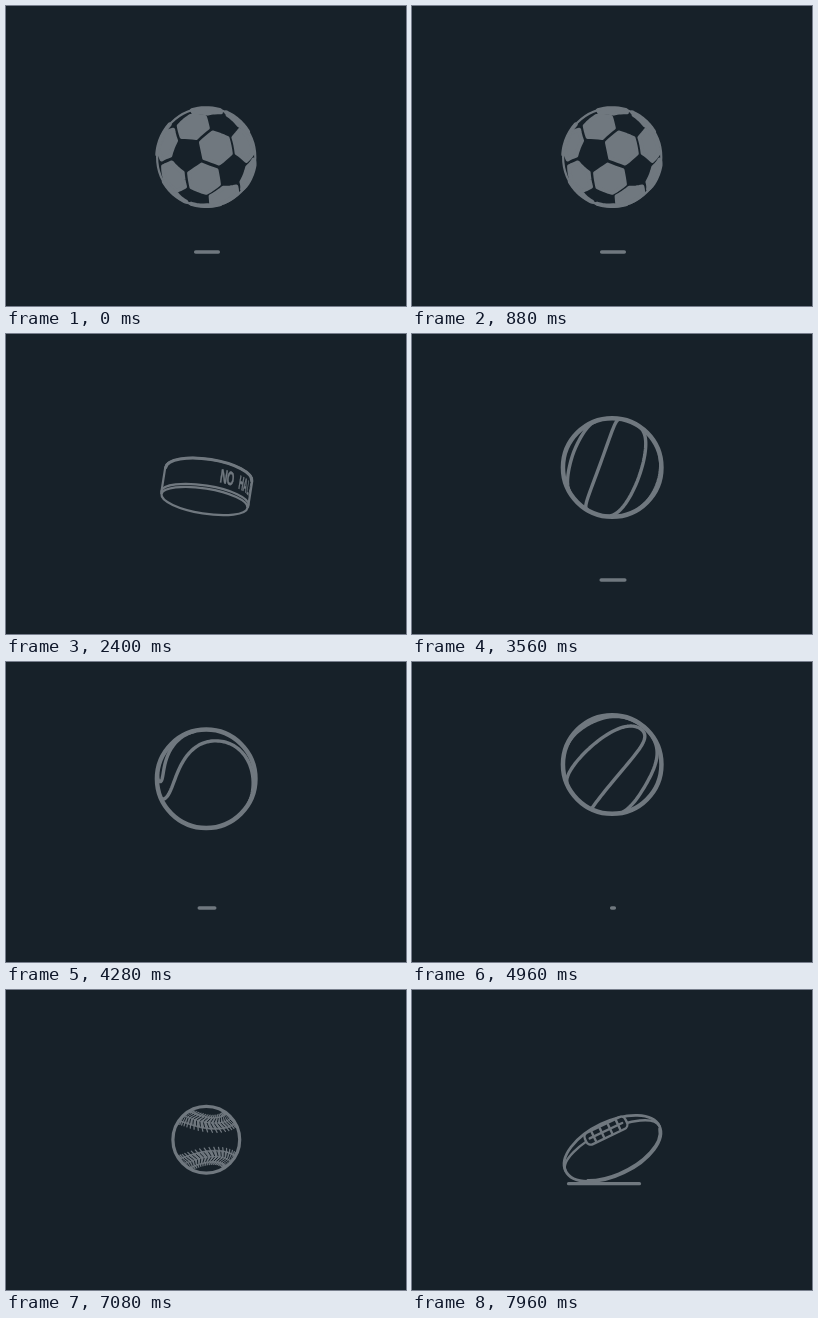
Animation of 400 by 300 pixels, one loop 8 s. Source, as an HTML page with a canvas:

```html
<!DOCTYPE html>
<html lang="en">
<head>
<meta charset="utf-8">
<title>Sports balls</title>
<style>
  html, body { margin: 0; width: 100%; height: 100%; overflow: hidden; background: #172129; }
  canvas { display: block; width: 400px; height: 300px; }
</style>
</head>
<body>
<canvas id="stage" width="400" height="300"></canvas>
<script>
const ctx = document.getElementById('stage').getContext('2d');
const BG = '#172129', INK = '#70787f', LOOP = 8000, TAU = Math.PI * 2;
const rad = deg => deg * Math.PI / 180;

// --- vectors: x right, y down, z towards the viewer ---
const dot = (a, b) => a[0] * b[0] + a[1] * b[1] + a[2] * b[2];
const cross = (a, b) => [a[1] * b[2] - a[2] * b[1], a[2] * b[0] - a[0] * b[2], a[0] * b[1] - a[1] * b[0]];
const mix = (...terms) => [0, 1, 2].map(i => terms.reduce((sum, [k, v]) => sum + k * v[i], 0));
const unit = v => mix([1 / Math.hypot(...v), v]);
const rotate = (v, axis, angle) => {
  const c = Math.cos(angle);
  return mix([c, v], [Math.sin(angle), cross(axis, v)], [dot(axis, v) * (1 - c), axis]);
};
const SPIN_AXIS = unit([-.36, -.76, .54]);

function circle(r, width) {
  ctx.lineWidth = width;
  ctx.beginPath();
  ctx.arc(0, 0, r - width / 2, 0, TAU);
  ctx.stroke();
}

function segment(x1, y1, x2, y2) {
  ctx.beginPath();
  ctx.moveTo(x1, y1);
  ctx.lineTo(x2, y2);
  ctx.stroke();
}

// Strokes the part of a curve that lies on the near side of a sphere.
function strokeNear(points, r) {
  let drawing = false;
  ctx.beginPath();
  for (const [x, y, z] of points) {
    if (z > 0) drawing ? ctx.lineTo(x * r, y * r) : ctx.moveTo(x * r, y * r);
    drawing = z > 0;
  }
  ctx.stroke();
}

// --- bouncing ---
function bounce(t, { apexTime, period, top, drop, squash, shadow, r }, drawBall) {
  const phase = (t - apexTime) / period;
  const d = Math.abs(phase - Math.round(phase)) * 2;   // 0 at the apex, 1 on the ground
  const s = squash * Math.max(0, (d - .86) / .14);
  const w = shadow * d;
  if (w > 1) {
    ctx.lineWidth = Math.min(3.6, w);
    const half = Math.max(.05, (w - 3.6) / 2);
    segment(201 - half, 246, 201 + half, 246);
  }
  ctx.translate(200.2, top + drop * d * d + r * s);
  ctx.scale(1 + s, 1 - s);
  drawBall();
}

// --- soccer ball: hexagons of a truncated icosahedron ---
const hexagons = (() => {
  const n = unit([-.41, -.06, .91]), toHex = [.27, -.21, .945];
  const u = unit(mix([1, toHex], [-dot(toHex, n), n])), v = cross(n, u);
  const half = [n];
  for (let k = 0; k < 5; k++) {
    const a = rad(36 + 72 * k), s = 2 / Math.sqrt(5);
    half.push(mix([1 / Math.sqrt(5), n], [s * Math.cos(a), u], [s * Math.sin(a), v]));
  }
  const verts = half.concat(half.map(p => mix([-1, p])));
  const near = (a, b) => dot(a, b) > .4;
  const list = [];
  verts.forEach((a, i) => verts.slice(i + 1).forEach((b, j) => verts.slice(i + j + 2).forEach(c => {
    if (!near(a, b) || !near(b, c) || !near(a, c)) return;
    const mid = unit(mix([1, a], [1, b], [1, c]));
    const corners = [[a, b], [b, a], [b, c], [c, b], [c, a], [a, c]]
      .map(([p, q]) => mix([.8, unit(mix([2, p], [1, q]))], [.2, mid]));
    const outline = corners.flatMap((p, k) => [0, .25, .5, .75]
      .map(f => unit(mix([1 - f, p], [f, corners[(k + 1) % 6]]))));
    list.push(outline);
  })));
  return list;
})();

function soccerBall(t) {
  const r = 49, angle = TAU * t / 880;
  for (const hex of hexagons) {
    const pts = hex.map(p => rotate(p, SPIN_AXIS, angle));
    if (pts.every(p => p[2] < 0)) continue;
    ctx.beginPath();
    for (const [x, y, z] of pts) {
      const k = z < 0 ? r / Math.hypot(x, y) : r;
      ctx.lineTo(x * k, y * k);
    }
    ctx.closePath();
    ctx.lineWidth = 4;
    ctx.fill();
    ctx.stroke();
  }
  circle(50.2, 2.2);
}

// --- basketball: two concentric ovals that reach beyond the poles ---
const ovals = (() => {
  const q = unit([.34, -.94, 0]), m = unit([.17, .06, .98]), w = cross(m, q);
  return [[100, 25], [120, 68]].map(([length, width]) => Array.from({ length: 121 }, (_, i) => {
    const a = TAU * i / 120, along = rad(length) * Math.cos(a), across = rad(width) * Math.sin(a);
    return mix([Math.cos(across) * Math.cos(along), m],
               [Math.cos(across) * Math.sin(along), q],
               [Math.sin(across), w]);
  }));
})();

function basketball(t) {
  const angle = rad(405) * (t - 3560) / 1400;
  ctx.lineWidth = 3.4;
  for (const oval of ovals) strokeNear(oval.map(p => rotate(p, SPIN_AXIS, angle)), 49);
  circle(51.5, 4.5);
}

// --- puck ---
function puck(t) {
  const rx = 43.5, height = 27;
  const arc = (y, radius, ry) => ctx.ellipse(0, y, radius, ry, 0, Math.PI, TAU);
  ctx.translate(198.5, 167);
  ctx.rotate(rad(9));
  ctx.lineWidth = 2.2;
  ctx.beginPath();
  ctx.ellipse(0, 0, rx, 12.5, 0, 0, TAU);
  ctx.stroke();
  ctx.beginPath();
  arc(-3, rx + .5, 12.5);
  ctx.stroke();
  ctx.beginPath();
  ctx.moveTo(-rx - .5, -1);
  arc(-height, rx + .5, 15);
  ctx.lineTo(rx + .5, -1);
  ctx.stroke();
  ctx.lineWidth = 3;
  ctx.beginPath();
  arc(-height, rx, 15);
  ctx.stroke();

  ctx.font = 'bold 19px "Liberation Sans", Arial, sans-serif';
  ctx.textAlign = 'center';
  ctx.lineWidth = .6;
  const lead = rad(21) - TAU * (t - 2400) / 1280;
  [...'NO HALFTIME'].forEach((letter, i) => {
    const a = lead + rad(10) * i, c = Math.cos(a);
    if (c < .05) return;
    ctx.save();
    ctx.translate(rx * Math.sin(a), -9.5 - 12 * c);
    ctx.transform(.58 * c, .15 * Math.sin(a), 0, 1, 0, 0);
    ctx.fillText(letter, 0, 0);
    ctx.strokeText(letter, 0, 0);
    ctx.restore();
  });
}

// --- baseball: stitched band along a tennis-ball curve ---
function seamPoint(a) {
  const x = .75 * Math.cos(a) + .25 * Math.cos(3 * a);
  const y = .75 * Math.sin(a) - .25 * Math.sin(3 * a);
  return [-Math.sqrt(.75) * Math.sin(2 * a), (x - y) / Math.SQRT2, (x + y) / Math.SQRT2];
}

function baseball(t) {
  const r = 33.5, angle = rad(10) + TAU * (t - 6160) / 1200, steps = 88;
  const at = (a, offset, ahead = 0) => {
    const p = seamPoint(a), along = unit(mix([1, seamPoint(a + .01)], [-1, p]));
    return rotate(unit(mix([1, p], [offset, cross(p, along)], [ahead, along])), [0, 1, 0], angle);
  };
  const stitches = Array.from({ length: steps }, (_, i) => TAU * i / steps);
  for (const a of stitches) {
    const next = a + TAU / steps;
    const quad = [at(a, -.21), at(a, .21), at(next, .21), at(next, -.21)];
    if (quad.some(p => p[2] < 0)) continue;
    ctx.beginPath();
    quad.forEach(p => ctx.lineTo(p[0] * r, p[1] * r));
    ctx.closePath();
    ctx.lineWidth = .7;
    ctx.fill();
    ctx.stroke();
  }
  for (const a of stitches) for (const side of [-1, 1]) {
    ctx.lineWidth = 1.2;
    ctx.strokeStyle = INK;
    strokeNear([at(a, side * .2), at(a, side * .31, .05)], r);
    ctx.lineWidth = 1;
    ctx.strokeStyle = BG;
    strokeNear([at(a, side * .03), at(a, side * .16, .07)], r);
  }
  ctx.strokeStyle = INK;
  circle(35, 3.2);
}

// --- football tipping over on the ground line ---
function football(t) {
  const p = Math.min(1, (t - 7600) / 360);
  const angle = rad(-90 + 64.5 * p * p * (3 - 2 * p));
  const rx = 52, ry = 27;
  const reach = Math.hypot(rx * Math.sin(angle), ry * Math.cos(angle));
  ctx.lineWidth = 3.2;
  segment(156.5, 193.7, 227.5, 193.7);
  ctx.translate(200.5, 191.5 - reach);
  ctx.rotate(angle);
  ctx.lineWidth = 2.8;
  ctx.beginPath();
  ctx.ellipse(0, 0, rx, ry, 0, 0, TAU);
  ctx.stroke();
  ctx.lineWidth = 2.4;
  ctx.beginPath();
  ctx.ellipse(0, 0, rx, 19, 0, Math.PI, TAU);
  ctx.stroke();
  ctx.beginPath();
  ctx.ellipse(0, 0, rx - 1, ry - 1.5, 0, .1, Math.PI * .75);
  ctx.stroke();

  ctx.translate(1.7, -18.8);
  ctx.beginPath();
  ctx.roundRect(-22.5, -6.5, 45, 13, 5);
  ctx.fillStyle = BG;
  ctx.fill();
  ctx.stroke();
  segment(-18, 0, 18, 0);
  for (let x = -13.5; x < 14; x += 9) segment(x, -5, x, 5);
}

function draw(t) {
  ctx.setTransform(1, 0, 0, 1, 0, 0);
  ctx.fillStyle = BG;
  ctx.fillRect(0, 0, 400, 300);
  ctx.fillStyle = ctx.strokeStyle = INK;
  ctx.lineCap = ctx.lineJoin = 'round';
  if (t < 1760) {
    bounce(t, { apexTime: -323, period: 880, top: 98, drop: 98, squash: .11, shadow: 35.5, r: 50 }, () => soccerBall(t));
  } else if (t < 3040) {
    puck(t);
  } else if (t < 6020) {
    bounce(t, { apexTime: 3328, period: 790, top: 100.8, drop: 94, squash: .13, shadow: 46, r: 51 }, () => basketball(t));
  } else if (t < 7600) {
    ctx.translate(200.3, 149.8);
    baseball(t);
  } else {
    football(t);
  }
}

function tick() {
  draw(performance.now() % LOOP);
  requestAnimationFrame(tick);
}
tick();
</script>
</body>
</html>
```
